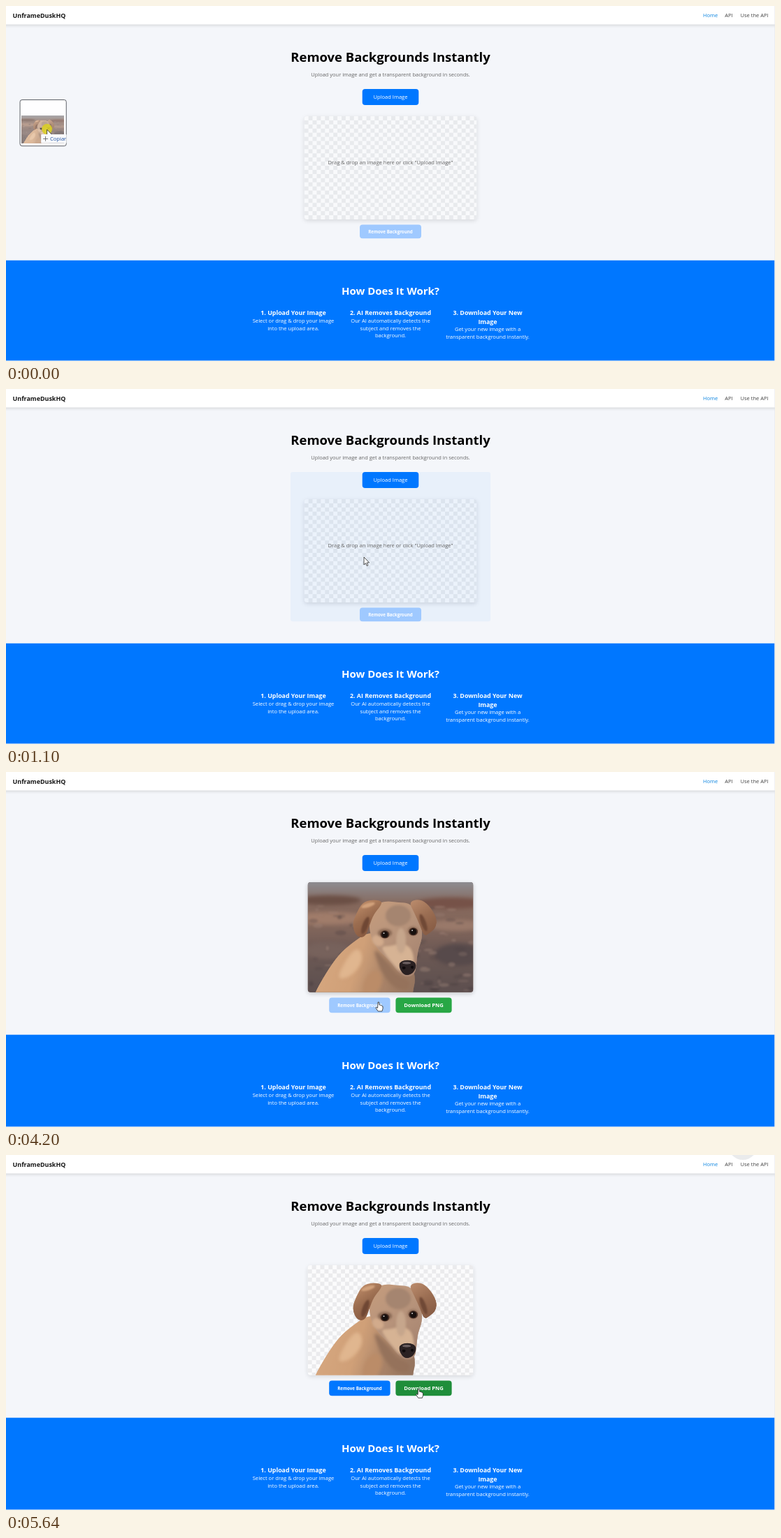
Recreate the animation shown at these times as an HTML page with a canvas. Size 1100 by 509 pixels, loop 6.17 s.

```html
<!DOCTYPE html>
<html lang="en">
<head>
<meta charset="utf-8">
<title>Background remover</title>
<style>
  html, body { margin: 0; width: 100%; height: 100%; overflow: hidden; background: #f4f6fa; }
  canvas { display: block; width: 1100px; height: 509px; }
</style>
</head>
<body>
<canvas id="stage"></canvas>
<script>
const W = 1100, H = 509, LOOP = 6170;
const BLUE = '#0077ff', PALE = '#9fc9ff', DEEP = '#0062d6', GREEN = '#28a745', MOSS = '#1f8e3a';
const FONT = '"Open Sans", "Noto Sans", sans-serif';
const DROP = 1030, LOADED = 1230, CLICK = 2260, DONE = 4200, CUT = 4330;

const canvas = document.getElementById('stage');
const ctx = canvas.getContext('2d');
const dpr = window.devicePixelRatio || 1;
canvas.width = W * dpr;
canvas.height = H * dpr;

const clamp = v => Math.max(0, Math.min(1, v));
const ramp = (t, from, to) => clamp((t - from) / (to - from));
const ease = p => p * p * (3 - 2 * p);

function mix(a, b, p) {
  const part = (hex, i) => parseInt(hex.slice(i, i + 2), 16);
  const rgb = [1, 3, 5].map(i => Math.round(part(a, i) + (part(b, i) - part(a, i)) * p));
  return `rgb(${rgb})`;
}

// keys: [time, x, y]
function along(keys, t) {
  let i = 1;
  while (i < keys.length - 1 && t > keys[i][0]) i++;
  const [a, b] = [keys[i - 1], keys[i]];
  const p = ramp(t, a[0], b[0]);
  return [a[1] + (b[1] - a[1]) * p, a[2] + (b[2] - a[2]) * p];
}

function text(str, x, y, size, color, { weight = 400, align = 'center' } = {}) {
  ctx.font = `${weight} ${size}px ${FONT}`;
  ctx.textAlign = align;
  ctx.fillStyle = color;
  ctx.fillText(str, x, y);
}

function box(x, y, w, h, r, color) {
  ctx.beginPath();
  ctx.roundRect(x, y, w, h, r);
  ctx.fillStyle = color;
  ctx.fill();
}

function withShadow(color, blur, dy, draw) {
  ctx.save();
  ctx.shadowColor = color;
  ctx.shadowBlur = blur * dpr;
  ctx.shadowOffsetY = dy * dpr;
  draw();
  ctx.restore();
}

// ---- dog picture, 236 x 158 ----

function blob(g, color, pts) {
  const n = pts.length / 2;
  const at = i => [pts[(i % n) * 2], pts[(i % n) * 2 + 1]];
  const mid = i => at(i).map((v, k) => (v + at(i + 1)[k]) / 2);
  g.beginPath();
  g.moveTo(...mid(0));
  for (let i = 1; i <= n; i++) g.quadraticCurveTo(...at(i), ...mid(i));
  g.fillStyle = color;
  g.fill();
}

function oval(g, color, x, y, rx, ry, turn = 0) {
  g.beginPath();
  g.ellipse(x, y, rx, ry, turn, 0, 7);
  g.fillStyle = color;
  g.fill();
}

function shade(g, blur, draw) {
  g.save();
  g.filter = `blur(${blur}px)`;
  draw();
  g.restore();
}

function linear(g, x0, y0, x1, y1, ...colors) {
  const fill = g.createLinearGradient(x0, y0, x1, y1);
  colors.forEach((c, i) => fill.addColorStop(i / (colors.length - 1), c));
  return fill;
}

function scenery(g) {
  g.fillStyle = linear(g, 0, 0, 0, 158, '#8d8c91', '#86695d', '#83675c', '#6f5a55', '#655552', '#5d4f4f');
  g.fillRect(0, 0, 236, 158);
  shade(g, 6, () => {
    oval(g, '#a07c6a', 30, 52, 60, 9);
    oval(g, '#6b4f45', 30, 26, 46, 7);
    oval(g, '#765248', 205, 30, 50, 8);
    oval(g, '#99796a', 212, 62, 40, 8);
    oval(g, '#574a4b', 215, 104, 34, 16);
    oval(g, '#77625c', 28, 98, 34, 12);
  });
  let seed = 7;
  const rnd = () => (seed = seed * 16807 % 2147483647) / 2147483647;
  shade(g, 2.5, () => {
    for (let i = 0; i < 90; i++) {
      const tone = rnd() < .5 ? '#a98d80' : '#453a3c';
      g.globalAlpha = .15 + rnd() * .25;
      oval(g, tone, rnd() * 236, 34 + rnd() * 124, 2 + rnd() * 6, 1 + rnd() * 2.5);
    }
  });
}

function dog(g) {
  blob(g, linear(g, 30, 100, 156, 140, '#d5a67e', '#d0a078', '#a98368', '#94745f'),
    [88, 70, 62, 88, 44, 104, 26, 130, 6, 166, 6, 190, 150, 190, 149, 160, 155, 135, 140, 100, 110, 80]);
  shade(g, 5, () => {
    blob(g, '#95725b', [92, 92, 112, 112, 128, 134, 146, 140, 144, 156, 122, 152, 104, 128]);
    blob(g, '#e0b68f', [72, 92, 56, 108, 40, 140, 62, 136, 80, 112]);
    oval(g, '#bb8c68', 92, 146, 12, 20, .4);
  });
  blob(g, linear(g, 88, 30, 160, 110, '#c59c7d', '#b9957c', '#a78571'),
    [98, 31, 112, 27, 128, 29, 146, 30, 157, 46, 163, 66, 163, 82, 157, 98, 155, 118, 153, 132, 142, 137, 130, 131, 117, 113, 101, 98, 91, 82, 87, 62, 91, 44]);
  shade(g, 3, () => {
    blob(g, '#d6b394', [116, 92, 104, 92, 112, 106, 122, 118, 132, 130, 150, 128, 152, 108, 146, 92, 132, 88]);
    oval(g, '#a58570', 129, 48, 18, 15);
    oval(g, '#d2ab8c', 100, 84, 9, 7, .7);
    oval(g, '#876753', 110, 73, 10, 6);
    oval(g, '#876753', 150, 70, 7, 6);
    oval(g, '#c6a68c', 133, 84, 7, 18);
  });
  blob(g, linear(g, 66, 30, 96, 74, '#c28f6b', '#9b6d50', '#86573e'),
    [106, 27, 92, 25, 78, 29, 69, 45, 63, 62, 70, 79, 82, 79, 88, 62, 94, 46, 104, 34]);
  blob(g, linear(g, 148, 28, 180, 74, '#b98a6b', '#9a6d52', '#855a43'),
    [144, 28, 160, 24, 173, 33, 184, 51, 183, 65, 174, 73, 166, 78, 160, 62, 152, 44]);
  shade(g, 2, () => {
    oval(g, '#6f4734', 82, 62, 4, 13, .35);
    oval(g, '#704936', 165, 58, 3.5, 13, -.35);
    oval(g, '#d2a27c', 86, 33, 10, 3, -.3);
  });
  for (const [x, y] of [[110, 75], [150.5, 71]]) {
    oval(g, '#4b3025', x, y, 6.4, 5.6);
    oval(g, '#17100e', x, y, 4.6, 4.6);
    oval(g, '#d9d4d2', x - 1.5, y - 1.8, 1, .9);
  }
  blob(g, '#2a2122', [130, 115, 141, 111, 153, 114, 155, 122, 149, 132, 138, 134, 131, 125]);
  oval(g, '#6b5f60', 141, 116, 6, 1.8);
  oval(g, '#0f0b0c', 137, 123, 2.5, 2);
  oval(g, '#0f0b0c', 149, 122, 2, 2);
}

function picture(...layers) {
  const c = document.createElement('canvas');
  c.width = 236 * 2;
  c.height = 158 * 2;
  const g = c.getContext('2d');
  g.scale(2, 2);
  layers.forEach(layer => { g.save(); layer(g); g.restore(); });
  return c;
}

const photo = picture(scenery, dog);
const cutout = picture(dog);

// ---- page ----

function header() {
  withShadow('rgba(0,0,0,.14)', 4, 1, () => {
    ctx.fillStyle = '#fff';
    ctx.fillRect(-10, -10, W + 20, 36.5);
  });
  text('UnframeDuskHQ', 9.5, 16.5, 8.95, '#161616', { weight: 700, align: 'left' });
  text('Home', 997, 15.8, 7.5, '#0a84e0', { align: 'left' });
  text('API', 1028.3, 15.8, 7.5, '#444', { align: 'left' });
  text('Use the API', 1090.5, 15.8, 7.5, '#444', { align: 'right' });
}

function checker(x, y, w, h, light, dark) {
  const s = 5.92;
  withShadow('rgba(0,0,0,.12)', 6, 2, () => box(x, y, w, h, 4, light));
  ctx.save();
  ctx.clip();
  ctx.fillStyle = dark;
  for (let r = 0; r * s < h; r++)
    for (let c = (r + 1) % 2; c * s < w; c += 2) ctx.fillRect(x + c * s, y + r * s, s, s);
  ctx.restore();
}

function preview(t) {
  if (t < LOADED) {
    checker(426.7, 158, 246.6, 148, '#f8f9fb', '#e8eaed');
  } else if (t < CUT) {
    withShadow('rgba(0,0,0,.2)', 6, 2, () => box(431.7, 158, 236.6, 157.8, 4, '#75615b'));
    ctx.save();
    ctx.clip();
    ctx.drawImage(photo, 431.7, 158, 236.6, 157.8);
    ctx.restore();
  } else {
    checker(431.7, 158, 236.6, 157.8, '#fbfbfc', '#ebebed');
    ctx.save();
    ctx.clip();
    ctx.drawImage(cutout, 431.7, 158, 236.6, 157.8);
    ctx.restore();
  }
  const hot = t < LOADED ? ramp(t, 550, 720) : 1 - ramp(t, LOADED, 1360);
  if (hot) box(407, 119, 286, t < LOADED ? 214.3 : 224.3, 3, `rgba(0,119,255,${.05 * hot})`);
  if (t < LOADED) text('Drag & drop an image here or click "Upload Image"', 550, 227, 7.57, '#666');
}

function buttons(t) {
  box(509.7, 119, 80.6, 23, 4, BLUE);
  text('Upload Image', 550, 133.3, 7.53, '#fff');
  const label = (str, x, y) => text(str, x, y, 6.23, '#fff', { weight: 700 });
  if (t < CLICK) {
    const y = t < LOADED ? 313.6 : 323.6;
    const fill = t < 1900 ? mix(PALE, BLUE, ramp(t, LOADED, 1430)) : mix(BLUE, DEEP, ramp(t, 1900, 2050));
    box(506, y, 88, 19.7, 4, fill);
    label('Remove Background', 550, y + 12.2);
  } else if (t < DONE) {
    box(519, 323.6, 62, 19.7, 4, mix(DEEP, PALE, ramp(t, CLICK, 2520)));
    label('Processing...', 550, 335.8);
  } else {
    box(462.2, 323.6, 87.4, 21.6, 4, mix(PALE, BLUE, ramp(t, CUT, 4530)));
    label('Remove Background', 506, 336.8);
    box(557.4, 323.6, 80.2, 21.6, 4, mix(GREEN, MOSS, ramp(t, 4540, 4740)));
    text('Download PNG', 597.5, 337.3, 7.62, '#fff', { weight: 700 });
  }
}

const steps = [
  [411, ['1. Upload Your Image'], ['Select or drag & drop your image', 'into the upload area.']],
  [550, ['2. AI Removes Background'], ['Our AI automatically detects the', 'subject and removes the', 'background.']],
  [689, ['3. Download Your New', 'Image'], ['Get your new image with a', 'transparent background instantly.']]
];

function howItWorks(t) {
  const top = t < LOADED ? 364.7 : t < DONE ? 374.9 : 376.7;
  ctx.fillStyle = BLUE;
  ctx.fillRect(0, top, 1099.4, 508.4 - top);
  text('How Does It Work?', 550, top + 49, 15, '#fff', { weight: 700 });
  for (const [x, title, lines] of steps) {
    let y = top + 78.5;
    for (const line of title) {
      text(line, x, y, 8.85, '#fff', { weight: 700 });
      y += 12.3;
    }
    y -= 1.6;
    for (const line of lines) {
      text(line, x, y, 7.6, '#fff');
      y += 10.6;
    }
  }
}

// ---- pointer ----

function outline(x, y, pts) {
  ctx.beginPath();
  for (let i = 0; i < pts.length; i += 2) ctx.lineTo(x + pts[i], y + pts[i + 1]);
  ctx.closePath();
  ctx.fillStyle = '#fff';
  ctx.fill();
  ctx.strokeStyle = '#222';
  ctx.lineWidth = .8;
  ctx.lineJoin = 'round';
  ctx.stroke();
}

const arrow = (x, y) => outline(x, y, [0, 0, 0, 11, 2.5, 8.7, 4.2, 12.6, 5.9, 11.8, 4.2, 8, 7.6, 8]);
const hand = (x, y) => outline(x, y, [-1, 0, .6, 0, 1, 4, 2.6, 4, 3.1, 4.7, 4.4, 4.7, 5, 5.6, 6, 6,
  6, 9.4, 4.9, 13, -.8, 13, -4, 8.4, -3.6, 7.3, -1.4, 8.3]);

function forbidden(x, y) {
  ctx.beginPath();
  ctx.arc(x, y, 4.6, 0, 7);
  ctx.fillStyle = '#fff';
  ctx.fill();
  ctx.moveTo(x - 3.2, y - 3.2);
  ctx.lineTo(x + 3.2, y + 3.2);
  ctx.strokeStyle = '#c4202b';
  ctx.lineWidth = 1.7;
  ctx.stroke();
}

const dragPath = [[0, 19, 134], [140, 108, 149], [270, 203, 163], [410, 297, 175], [620, 440, 192], [720, 473, 198]];

function dragged(t) {
  const [x, y] = along(dragPath, t);
  box(x + .4, y + .4, 66.2, 66.2, 3, 'rgba(255,255,255,.92)');
  ctx.strokeStyle = '#5d6066';
  ctx.lineWidth = 1;
  ctx.stroke();
  ctx.globalAlpha = .75;
  ctx.drawImage(photo, x + 2.5, y + 22.8, 60.5, 40.4);
  ctx.globalAlpha = 1;
  oval(ctx, 'rgba(218,208,30,.85)', x + 42.5 - 3.5, y + 42.5, 7.5, 7.5);
  arrow(x + 39, y + 43);
  box(x + 30.5, y + 50, 36.5, 12.6, 1, '#f8f9fb');
  ctx.fillStyle = '#555';
  ctx.fillRect(x + 33.5, y + 55.8, 7, .8);
  ctx.fillRect(x + 36.6, y + 52.7, .8, 7);
  text('Copiar', x + 43.3, y + 59.2, 7.6, '#1d50a2', { align: 'left' });
}

function pointer(t) {
  if (t < DROP) return dragged(t);
  if (t < 2400) {
    const p = ease(ramp(t, 1340, 1900));
    const x = 512 + 20.5 * p, y = 241 + 89 * p;
    return y > 323 ? hand(x, y) : arrow(x, y);
  }
  if (t < DONE) return forbidden(532.3, 329.3);
  const p = ease(ramp(t, CUT, 4780));
  hand(533 + 56.5 * p + ramp(t, 4880, 5000), 330 + 5.3 * p);
}

// disc rising to the toolbar once the download starts
function downloadDisc(t) {
  if (t < 4980) return;
  const p = ramp(t, 4980, 5640);
  const y = 225 - 239 * (1 - (1 - p) ** 1.6);
  oval(ctx, `rgba(70,74,80,${.11 * ramp(t, 4960, 5100)})`, 1054, y, 21, 21);
}

function draw(t) {
  ctx.setTransform(dpr, 0, 0, dpr, 0, 0);
  ctx.fillStyle = '#f4f6fa';
  ctx.fillRect(0, 0, W, H);
  header();
  text('Remove Backgrounds Instantly', 550, 79.6, 18.45, '#000', { weight: 700 });
  text('Upload your image and get a transparent background in seconds.', 550, 100.8, 7.47, '#666');
  preview(t);
  buttons(t);
  howItWorks(t);
  ctx.fillStyle = '#e6e8ec';
  ctx.fillRect(1099.4, 0, .6, H);
  pointer(t);
  downloadDisc(t);
}

const start = performance.now();
function tick() {
  draw((performance.now() - start) % LOOP);
  requestAnimationFrame(tick);
}
tick();
</script>
</body>
</html>
```
